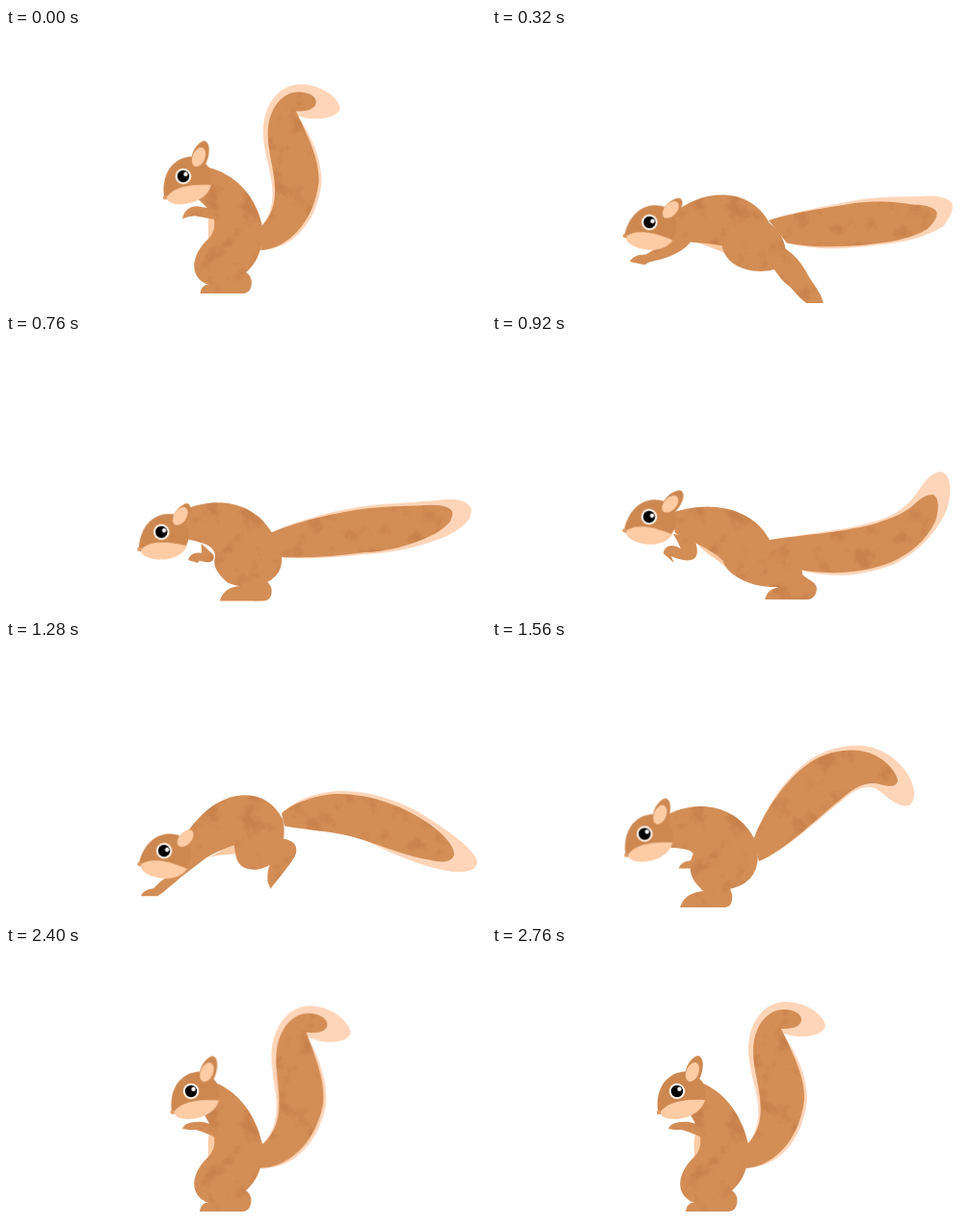
Recreate the animation shown at these times as an HTML page without scripts. Size 498x289 px, loop 3.48 s.

```html
<!DOCTYPE html>
<html lang="en">
<head>
<meta charset="utf-8">
<title>Leaping squirrel</title>
<style>
html, body { margin: 0; width: 100%; height: 100%; overflow: hidden; background: #fff; }
svg { display: block; width: 100vw; height: 100vh; }
.fur { fill: #d38e56; }
.light { fill: #fdcba4; }
.pale { fill: #fed5b9; }
svg * { animation: 3480ms linear infinite; }
#brush { animation-name: brush; }
#brushCore { animation-name: brushCore; }
#wag { animation-name: wag; transform-origin: 264px 218px; }
#belly { animation-name: belly; }
#torso { animation-name: torso; }
#leg { animation-name: leg; }
#arm { animation-name: arm; }
#head { animation-name: head; }
#ear { animation-name: ear; transform-origin: 15px -14px; }

/* sit, push off, reach, land, gather, push off, reach, land, settle, sit */
@keyframes brush {
  0%, 54.02%, 100% { d: path("M265 206C290 175 266 140 266 108C266 78 283 58 305 58C325 58 346 72 346 84C340 96 316 96 302 91C316 112 327 135 327 160C322 205 295 230 264 231Z"); }
  5.17%, 26.44% { d: path("M288 214C320 208 365 205 400 194C420 188 432 178 441 165C450 150 458 143 466 143C476 145 478 163 472 182C462 205 445 225 418 239C385 252 350 255 318 245Z"); }
  14.94%, 36.78% { d: path("M286 180C300 166 325 157 348 157C385 157 420 172 445 190C468 205 489 222 489 232C487 241 475 242 462 241C430 236 400 222 370 207C345 199 315 198 289 193Z"); }
  16.09%, 37.93% { d: path("M284 185C300 165 330 157 357 157C385 157 425 168 450 182C470 193 491 210 491 219C490 230 475 231 463 230C430 228 400 212 365 205C335 201 310 201 287 199Z"); }
  21.26% { d: path("M272 206C305 190 340 180 375 176C405 174 430 174 448 174C470 172 484 178 485 188C484 202 470 208 455 214C425 224 395 228 365 228C335 230 305 232 277 230Z"); }
  44.83% { d: path("M272 206C283 175 305 142 330 125C345 115 362 110 380 110C412 110 438 138 439 160C438 176 430 177 413 166C395 148 388 152 375 158C345 180 305 220 277 230Z"); animation-timing-function: cubic-bezier(.15,.5,.5,1); }
}
@keyframes brushCore {
  0%, 54.02%, 100% { d: path("M265 206C292 178 271 140 271 110C271 84 285 66 303 66C315 66 322 72 321 78C318 86 308 86 300 86C312 112 325 135 324 160C319 202 292 229 264 231Z"); }
  5.17%, 26.44% { d: path("M288 214C320 209 360 207 395 198C415 192 428 186 437 178C445 170 452 166 458 167C464 170 464 182 460 195C450 215 435 228 415 237C385 249 350 251 318 245Z"); }
  14.94%, 36.78% { d: path("M286 180C300 168 325 160 345 160C380 160 415 174 440 192C455 203 465 215 465 223C463 232 450 232 440 229C415 225 390 214 368 207C340 198 315 198 289 193Z"); }
  16.09%, 37.93% { d: path("M284 185C300 168 325 160 350 160C380 160 415 168 440 181C455 190 467 203 467 210C466 219 455 221 445 220C420 217 395 212 365 205C335 200 310 200 287 198Z"); }
  21.26% { d: path("M272 206C305 191 340 183 372 179C400 177 420 178 436 178C454 178 464 182 464 189C463 199 454 204 442 210C415 221 390 226 365 226C335 229 305 231 277 230Z"); }
  44.83% { d: path("M272 206C283 177 305 145 330 128C345 118 360 115 375 115C402 115 420 135 422 147C420 154 415 153 405 151C390 147 382 152 373 157C343 180 303 220 277 230Z"); animation-timing-function: cubic-bezier(.15,.5,.5,1); }
}
@keyframes wag {
  0%, 65.52%, 79.31%, 100% { transform: rotate(0deg); animation-timing-function: ease-in-out; }
  72.41% { transform: rotate(10deg); animation-timing-function: ease-in-out; }
}
@keyframes belly {
  0%, 54.02%, 100% { d: path("M213 190C206 205 213 212 208 224C215 220 225 210 220 192Z"); }
  5.17%, 26.44% { d: path("M208 212C220 228 230 232 243 242C245 235 235 220 210 210Z"); }
  14.94%, 36.78% { d: path("M204 230C215 222 228 224 240 222C242 215 240 210 237 211Z"); }
  16.09%, 37.93% { d: path("M205 233C212 229 220 228 229 225C232 222 230 215 226 216Z"); }
  21.26%, 44.83% { d: path("M213 222C213 225 212 228 212 232C220 230 225 225 216 220Z"); animation-timing-function: cubic-bezier(.15,.5,.5,1); }
}
@keyframes torso {
  0% { d: path("M200 143C233 147 258 170 266 206C268 232 258 247 247 256C230 268 212 270 204 264C190 254 194 236 207 222C219 212 217 200 214 192C208 186 200 178 194 174Z"); }
  5.17%, 26.44% { d: path("M186 186C225 172 270 180 288 214C312 220 325 240 322 256C310 266 275 266 255 253C245 247 240 240 240 236C232 228 222 222 190 207Z"); }
  14.94%, 36.78% { d: path("M183 208C215 152 268 148 287 186C292 205 285 225 274 234C262 241 248 240 242 232C238 226 238 218 237 213C222 218 205 226 187 240Z"); }
  16.09%, 37.93% { d: path("M183 211C215 155 270 150 286 188C290 208 278 225 262 232C248 240 234 238 229 229C225 222 227 218 226 218C218 226 205 232 187 246Z"); }
  21.26%, 44.83% { d: path("M168 190C200 165 250 165 272 206C281 230 274 252 250 258C235 262 225 263 219 261C210 252 205 245 206 235C213 222 211 217 186 216Z"); animation-timing-function: cubic-bezier(.15,.5,.5,1); }
  54.02%, 100% { d: path("M207 139C235 145 258 170 266 206C268 232 258 247 247 256C230 268 212 270 204 264C190 254 194 236 207 222C219 212 217 200 214 192C212 186 208 178 203 172Z"); }
}
@keyframes leg {
  0%, 54.02%, 100% { d: path("M245 252C252 255 256 261 254 268C253 274 249 276 245 276L201 276C202 268 207 266 214 266C218 260 220 256 222 250Z"); }
  5.17%, 26.44% { d: path("M318 245C325 256 336 256 337 264C337 272 332 276 327 276L283 276C285 268 289 265 295 264C299 263 300 258 300 250Z"); }
  10.06%, 31.32% { d: path("M300 225C318 235 322 250 330 262C338 272 345 280 347 288L335 288C325 282 318 275 312 270C300 262 292 252 285 240Z"); }
  14.94%, 36.78% { d: path("M280 206C302 206 304 216 300 225C293 237 283 248 275 259L272 251C272 244 272 238 274 235C274 225 272 215 270 210Z"); }
  16.09%, 37.93% { d: path("M278 205C292 212 291 222 284 229C275 237 262 245 250 254L249 248C250 244 252 240 255 236C258 225 262 215 268 210Z"); }
  21.26%, 44.83% { d: path("M245 250C247 262 250 262 249 270C248 276 246 278 240 278L195 278C198 268 206 262 220 261C222 260 225 255 226 250Z"); animation-timing-function: cubic-bezier(.15,.5,.5,1); }
}
@keyframes arm {
  0% { d: path("M216 187C208 187 203 186 198 185C190 185 185 190 183 198L189 196L196 195C203 196 210 198 217 199Z"); }
  5.17%, 26.44% { d: path("M188 208C192 214 194 218 196 223C187 217 179 220 178 228L189 238L186 231C200 237 222 242 209 210Z"); }
  10.06%, 31.32% { d: path("M188 215C178 225 165 232 152 238C143 239 138 242 136 246L152 248L158 246C178 240 195 232 209 220Z"); }
  14.94%, 36.78% { d: path("M190 232C175 245 166 243 153 258C145 259 141 262 140 266L157 266L163 262C180 247 195 236 208 226Z"); }
  16.09%, 37.93% { d: path("M190 240C178 252 168 262 160 266C150 267 147 270 146 274L164 274L168 267C185 250 198 240 208 232Z"); }
  21.26%, 44.83% { d: path("M209 222C207 226 207 228 206 230C199 230 195 234 194 238L203 238L207 238C212 238 215 238 218 238Z"); animation-timing-function: cubic-bezier(.15,.5,.5,1); }
  54.02%, 100% { d: path("M216 186C208 184 203 182 198 183C190 183 185 185 183 190L189 191L197 191C205 193 210 196 218 199Z"); }
}
@keyframes head {
  0% { transform: translate(184px, 154px) rotate(0deg); }
  5.17%, 26.44% { transform: translate(163px, 190px) rotate(20deg); }
  14.94%, 36.78% { transform: translate(164px, 219px) rotate(21deg); }
  16.09%, 37.93% { transform: translate(165px, 226px) rotate(20deg); }
  21.26% { transform: translate(161px, 208px) rotate(10deg); }
  44.83% { transform: translate(158px, 202px) rotate(0deg); animation-timing-function: cubic-bezier(.15,.5,.5,1); }
  54.02%, 65.52%, 79.31%, 100% { transform: translate(192px, 151px) rotate(0deg); }
  72.41% { transform: translate(192px, 151px) rotate(2deg); }
}
@keyframes ear {
  0%, 5.17%, 26.44%, 44.83%, 100% { transform: scale(1); }
  14.94%, 16.09%, 36.78%, 37.93% { transform: scale(.75); }
}
</style>
</head>
<body>
<svg viewBox="0 0 498 289">
  <defs>
    <!-- Mottled paper grain kept inside the shape -->
    <filter id="grain" color-interpolation-filters="sRGB">
      <feTurbulence type="fractalNoise" baseFrequency=".045" numOctaves="4" seed="7"/>
      <feColorMatrix values="0 0 0 0 .72  0 0 0 0 .42  0 0 0 0 .22  5 0 0 0 -2.75"/>
      <feComponentTransfer><feFuncA type="linear" slope=".35"/></feComponentTransfer>
      <feComposite in2="SourceAlpha" operator="in" result="spots"/>
      <feMerge><feMergeNode in="SourceGraphic"/><feMergeNode in="spots"/></feMerge>
    </filter>
  </defs>
  <g id="wag">
    <path id="brush" class="pale"/>
    <path id="brushCore" class="fur" filter="url(#grain)"/>
  </g>
  <path id="belly" class="light"/>
  <g class="fur" filter="url(#grain)">
    <path id="leg"/>
    <path id="torso"/>
    <path id="arm"/>
  </g>
  <g id="head">
    <path id="ear" fill="#cd8850" d="M9 -10C6 -22 13 -34 21 -37C29 -37 28 -20 22 -11Z"/>
    <path fill="#cd8850" d="M-20 20C-22 0 -14 -14 0 -19C8 -22 18 -21 22 -14C30 -9 30 3 28 9C15 18 -5 24 -18 24Z"/>
    <ellipse class="light" rx="6.5" ry="10.5" transform="translate(16 -20) rotate(22)"/>
    <path class="light" d="M-17 21C-8 10 10 8 29 9C25 24 8 29 -4 29C-12 29 -18 26 -17 21Z"/>
    <circle cx="-19" cy="22" r="2.2" fill="#dc9c68"/>
    <circle r="8.3" fill="#fff8f0"/>
    <circle r="6.2"/>
    <circle cx="2.5" cy="-2.2" r="2.2" fill="#fff"/>
  </g>
</svg>
</body>
</html>
```
